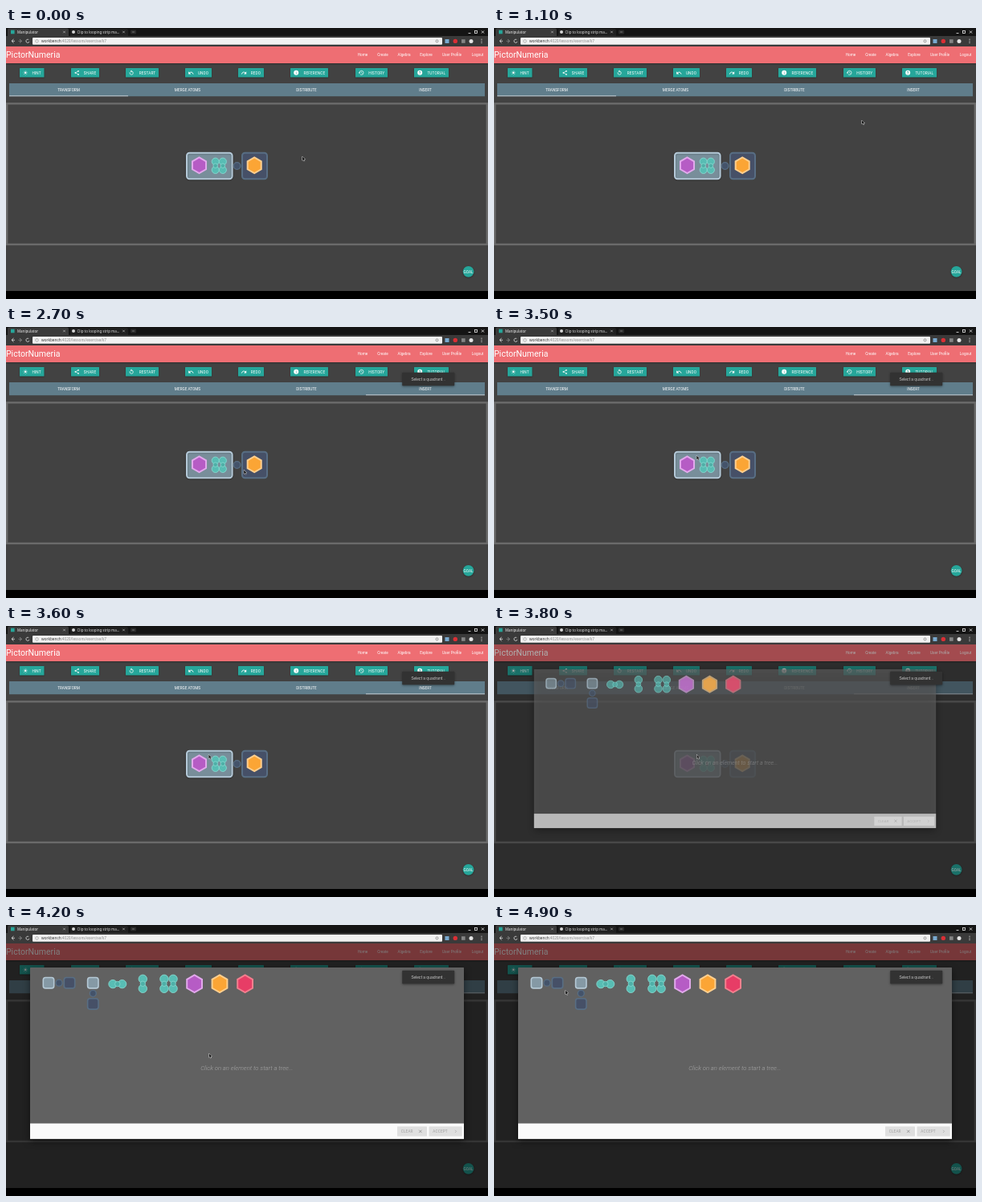
Write an HTML page with a canvas that moves like this. It is 600 by 338 pixels and loops after 5000 ms.

```html
<!DOCTYPE html>
<html lang="en">
<head>
<meta charset="utf-8">
<title>Manipulator</title>
<style>
html, body { margin: 0; width: 100%; height: 100%; overflow: hidden; background: #000; }
canvas { display: block; width: 600px; height: 338px; }
</style>
</head>
<body>
<canvas id="stage"></canvas>
<script>
const W = 600, H = 338, LOOP = 5000, STEP = 100;
const canvas = document.getElementById('stage');
const c = canvas.getContext('2d');
const dpr = window.devicePixelRatio || 1;
canvas.width = W * dpr;
canvas.height = H * dpr;

const SANS = 'Roboto, sans-serif';
const UI = '"Noto Sans", sans-serif';
const TEAL = '#26a69a';
const CLICK = 1897, OPEN = 3662;

const clamp = v => Math.max(0, Math.min(1, v));
const outQuad = v => 1 - (1 - clamp(v)) ** 2;
const outCubic = v => 1 - (1 - clamp(v)) ** 3;
const mix = (a, b, k) => a + (b - a) * k;

function rect(x, y, w, h, fill) {
  c.fillStyle = fill;
  c.fillRect(x, y, w, h);
}

function round(x, y, w, h, r, fill, edge, lw) {
  c.beginPath();
  c.roundRect(x, y, w, h, r);
  paint(fill, edge, lw);
}

function disc(x, y, r, fill, edge, lw) {
  c.beginPath();
  c.arc(x, y, r, 0, Math.PI * 2);
  paint(fill, edge, lw);
}

function paint(fill, edge, lw = 1) {
  if (fill) { c.fillStyle = fill; c.fill(); }
  if (edge) { c.strokeStyle = edge; c.lineWidth = lw; c.stroke(); }
}

function line(points, color, lw = 0.7, closed) {
  c.beginPath();
  points.forEach(([x, y]) => c.lineTo(x, y));
  if (closed) c.closePath();
  paint(null, color, lw);
}

function arc(x, y, r, a, b, color = '#fff', lw = 0.7) {
  c.beginPath();
  c.arc(x, y, r, a, b);
  paint(null, color, lw);
}

function poly(points, fill) {
  c.beginPath();
  points.forEach(([x, y]) => c.lineTo(x, y));
  c.closePath();
  paint(fill);
}

function text(s, x, y, size, color, align = 'left', style = '', family = SANS, gap = 0) {
  c.font = `${style} ${size}px ${family}`;
  c.letterSpacing = gap + 'px';
  c.textAlign = align;
  c.textBaseline = 'alphabetic';
  c.fillStyle = color;
  c.fillText(s, x, y);
}

function shadow(blur, dy, color, draw) {
  c.save();
  c.shadowBlur = blur * dpr;
  c.shadowOffsetY = dy * dpr;
  c.shadowColor = color;
  draw();
  c.restore();
}

function hexagon(x, y, r, fill, edge) {
  const ring = k => Array.from({ length: 6 }, (_, i) => {
    const a = Math.PI * (i / 3 - 0.5);
    return [x + k * Math.cos(a), y + k * Math.sin(a)];
  });
  poly(ring(r), edge);
  poly(ring(r - 2.3), fill);
}

const purple = (x, y, r) => hexagon(x, y, r, '#b65cc5', '#e2a9ec');
const orange = (x, y, r) => hexagon(x, y, r, '#fba535', '#ffcf8e');
const red = (x, y, r) => hexagon(x, y, r, '#e73d66', '#f27f8e');

function lobes(x, y, dx, dy, r) {
  for (const s of [-1, 1]) disc(x + s * dx, y + s * dy, r, '#58bdb4', '#87d8d0', 0.9);
  disc(x, y, r * 0.62, '#4fb0a8', '#87d8d0', 0.8);
}

function quad(x, y, dx, dy, r) {
  lobes(x - dx, y, 0, dy, r);
  lobes(x + dx, y, 0, dy, r);
}

const lightSlot = (x, y) => round(x - 6.7, y - 6.7, 13.4, 13.4, 3, '#8599a5', '#b5c9d6', 1.6);
const darkSlot = (x, y) => round(x - 6.7, y - 6.7, 13.4, 13.4, 3, '#465067', '#586e84', 1.6);
const joint = (x, y, r) => disc(x, y, r, '#44536a', '#586e84', 1.3);

function browser() {
  rect(0, 0, W, 11, '#141414');
  round(2, 0.5, 76, 12, [2, 2, 0, 0], '#3a3a3a');
  round(80, 1, 72, 9.5, [2, 2, 0, 0], '#202020');
  rect(0, 10, W, 13, '#3a3a3a');
  rect(6, 2.7, 4.6, 4.6, TEAL);
  text('Manipulator', 14, 6.9, 4.5, '#eee', 'left', '', UI);
  disc(84, 5, 2, '#d5d5d5');
  text('Clip to looping strip ma…', 88.5, 6.9, 4.5, '#ddd', 'left', '', UI);
  for (const x of [72.5, 146.5]) cross(x, 5, 1.3, '#ccc', 0.6);
  round(155, 2.5, 7, 5, 1, '#2b2b2b');
  line([[157, 5], [160, 5]], '#bbb', 0.5);

  line([[575.5, 6.5], [578.5, 6.5]], '#eee', 0.8);
  c.strokeStyle = '#eee';
  c.lineWidth = 0.8;
  c.strokeRect(583.5, 3.5, 3, 3);
  cross(593.5, 5, 1.6, '#eee', 0.8);

  line([[9.5, 14], [7, 16.3], [9.5, 18.6]], '#ddd', 0.9);
  line([[7, 16.3], [11, 16.3]], '#ddd', 0.8);
  line([[17, 14], [19.5, 16.3], [17, 18.6]], '#888', 0.9);
  line([[15.5, 16.3], [19.5, 16.3]], '#888', 0.8);
  arc(27, 16.3, 2.1, 0.3, 5.4, '#ddd', 0.8);
  round(33, 12, 510, 8.8, 1, '#f1f1f1');
  disc(38.5, 16.4, 1.8, null, '#777', 0.5);
  const size = 4.7;
  text('workbench', 44, 18.1, size, '#333', 'left', '', UI);
  const w = c.measureText('workbench').width;
  text(':4020/lessons/exercise/k7', 44 + w, 18.1, size, '#8a8a8a', 'left', '', UI);
  disc(536.5, 16.4, 1.5, null, '#666', 0.6);
  rect(546.5, 14, 5, 5, '#79a9cf');
  disc(559.3, 16.4, 2.7, '#d92f35');
  rect(567, 14.2, 4.6, 4.6, '#858585');
  disc(579, 16.4, 2.5, '#e4e4e4');
  for (const y of [14.2, 16.3, 18.4]) disc(592, y, 0.6, '#ddd');
}

function cross(x, y, r, color, lw) {
  line([[x - r, y - r], [x + r, y + r]], color, lw);
  line([[x + r, y - r], [x - r, y + r]], color, lw);
}

const icons = {
  HINT(x, y) {
    disc(x, y, 1.3, '#fff');
    for (let i = 0; i < 8; i++) {
      const a = i * Math.PI / 4;
      disc(x + 2.4 * Math.cos(a), y + 2.4 * Math.sin(a), 0.38, '#fff');
    }
  },
  SHARE(x, y) {
    line([[x + 1.8, y - 2], [x - 1.8, y], [x + 1.8, y + 2]], '#fff', 0.6);
    for (const [dx, dy] of [[1.8, -2], [-1.8, 0], [1.8, 2]]) disc(x + dx, y + dy, 0.9, '#fff');
  },
  RESTART(x, y) {
    arc(x, y + 0.3, 2.1, -1.4, 3.6);
    poly([[x + 0.3, y - 3.2], [x + 0.3, y - 0.4], [x - 1.5, y - 1.8]], '#fff');
  },
  UNDO(x, y, s = 1) {
    c.beginPath();
    c.moveTo(x - 2 * s, y + 0.3);
    c.quadraticCurveTo(x + 1.4 * s, y - 2.4, x + 2.9 * s, y + 1.8);
    paint(null, '#fff', 0.9);
    poly([[x - 3 * s, y - 1.6], [x - 3 * s, y + 1.6], [x + 0.2 * s, y + 1.6]], '#fff');
  },
  REDO(x, y) { icons.UNDO(x, y, -1); },
  REFERENCE(x, y) {
    disc(x, y, 3, '#fff');
    rect(x - 0.3, y - 0.4, 0.6, 2, TEAL);
    rect(x - 0.3, y - 1.6, 0.6, 0.6, TEAL);
  },
  HISTORY(x, y) {
    arc(x + 0.3, y, 2.5, -Math.PI, 2.3);
    poly([[x - 3.5, y - 0.2], [x - 0.9, y - 0.2], [x - 2.2, y + 1.2]], '#fff');
    line([[x + 0.3, y - 1.4], [x + 0.3, y + 0.2], [x + 1.4, y + 0.9]], '#fff', 0.5);
  },
  TUTORIAL(x, y) {
    disc(x, y, 3, '#fff');
    text('?', x, y + 1.7, 4.6, TEAL, 'center', 'bold');
  }
};

const buttons = [
  ['HINT', 17, 47.5], ['SHARE', 81, 116], ['RESTART', 149, 190], ['UNDO', 223, 256],
  ['REDO', 289, 321], ['REFERENCE', 354, 401], ['HISTORY', 435, 475], ['TUTORIAL', 508, 551]
];
const links = [['Home', 444], ['Create', 469], ['Algebra', 495.5], ['Explore', 523],
  ['User Profile', 555], ['Logout', 587]];

function page(t) {
  rect(0, 22.5, W, 305.5, '#424242');
  shadow(2, 0.7, 'rgba(0,0,0,.35)', () => rect(0, 23, W, 21, '#ee6e73'));
  text('PictorNumeria', 0, 37.2, 10.5, '#fff');
  for (const [s, x] of links) text(s, x, 35.2, 4.7, '#fff', 'center');

  for (const [s, x0, x1] of buttons) {
    shadow(1.5, 0.7, 'rgba(0,0,0,.4)', () => round(x0, 50, x1 - x0, 11.6, 0.6, TEAL));
    icons[s](x0 + 7.2, 55.8);
    text(s, x1 - 3.8, 57.5, 4.7, '#fff', 'right', '', SANS, 0.15);
  }

  rect(4, 69, 592, 16.2, '#607d8b');
  ['TRANSFORM', 'MERGE ATOMS', 'DISTRIBUTE', 'INSERT'].forEach((s, i) =>
    text(s, 78 + 148 * i, 78.7, 4.7, '#fff', 'center'));
  const left = mix(4, 448, outQuad((t - CLICK - 90) / 300));
  const right = mix(152, 596, outQuad((t - CLICK) / 300));
  rect(left, 84.4, right - left, 0.8, '#d8dde0');

  c.strokeStyle = '#6a6a6a';
  c.lineWidth = 2.4;
  c.strokeRect(1.2, 94.3, 597.6, 175.6);

  shadow(2, 0.6, 'rgba(0,0,0,.3)', () => round(225, 155.7, 56.6, 32.6, 3.5, '#788e9a', '#b4c9d8', 2));
  purple(240.5, 171.3, 11);
  quad(265.3, 171.8, 4.6, 5.2, 4.5);
  joint(287.6, 172, 4.3);
  round(294, 155.7, 31, 32.6, 3.5, '#465067', '#586e84', 2);
  orange(309.2, 171.3, 11);

  shadow(2, 0.8, 'rgba(0,0,0,.4)', () => disc(575.6, 303.8, 6.9, TEAL));
  text('GOAL', 575.6, 305.5, 4.7, '#fff', 'center');
}

function modal(t) {
  if (t < OPEN) return;
  const p = outQuad((t - OPEN) / 350);
  const k = mix(0.8, 1, p);
  rect(0, 22.5, W, 305.5, `rgba(0,0,0,${0.5 * p})`);

  c.save();
  c.globalAlpha = p;
  c.translate(300, mix(141, 160, p));
  c.scale(k, k);
  c.translate(-300, -160);
  shadow(8, 3, 'rgba(0,0,0,.5)', () => round(30, 53, 540, 214, 0.6, '#616161'));
  rect(30, 247.5, 540, 19.3, '#fafafa');

  lightSlot(53, 72.2);
  joint(66, 72.2, 4);
  darkSlot(79, 72.2);
  lightSlot(108.3, 72.2);
  joint(108.3, 85.3, 4);
  darkSlot(108.3, 98.4);
  lobes(138.8, 73.6, 5.8, 0, 5.2);
  lobes(170.3, 73.3, 0, 6, 5.2);
  quad(202.5, 73.3, 5.6, 6, 5.2);
  purple(234.6, 73.3, 12);
  orange(266, 73.3, 12);
  red(297.6, 73.3, 12);

  text('Click on an element to start a tree...', 299.7, 181.2, 7.7, '#a6a6a6', 'center', 'italic 300');

  const ink = '#9f9f9f';
  round(487, 251.3, 37, 12.2, 0.6, '#dfdfdf');
  round(526.5, 251.3, 41.2, 12.2, 0.6, '#dfdfdf');
  text('CLEAR', 491.7, 259.2, 4.7, ink, 'left', '', SANS, 0.15);
  text('ACCEPT', 531.3, 259.2, 4.7, ink, 'left', '', SANS, 0.15);
  cross(515.8, 257.4, 1.7, '#858585', 0.7);
  line([[559, 255.8], [560.6, 257.4], [559, 259]], ink, 0.6);
  c.restore();
}

function toast(t) {
  if (t < CLICK) return;
  const p = outCubic((t - CLICK) / 300);
  c.save();
  c.globalAlpha = p;
  c.translate(0, 10.9 * (1 - p));
  shadow(3, 1, 'rgba(0,0,0,.4)', () => round(493.2, 56.8, 65, 16.4, 0.6, '#323232'));
  text('Select a quadrant...', 525.7, 66.7, 5.1, '#fff', 'center', '300');
  c.restore();
}

// time, x, y of the pointer tip
const path = [
  [0, 369, 160.5], [500, 369, 160.5], [1100, 458, 115], [1200, 474, 99], [1600, 506, 82],
  [2000, 508, 81], [2100, 490, 92], [2400, 314, 174], [2500, 301, 178],
  [3000, 289, 179], [3100, 252, 160.5], [4400, 253, 160.5], [4900, 89, 81.7]
];

function pointer(t) {
  const i = Math.max(1, path.findIndex(p => p[0] >= t));
  const [a, b] = [path[i - 1], path[i]];
  const k = clamp((t - a[0]) / (b[0] - a[0]));
  c.save();
  c.translate(mix(a[1], b[1], k), mix(a[2], b[2], k));
  c.beginPath();
  for (const [x, y] of [[0, 0], [0, 4.7], [1.1, 3.8], [1.9, 5.5], [2.7, 5.1], [1.9, 3.5], [3.3, 3.3]]) c.lineTo(x, y);
  c.closePath();
  c.lineJoin = 'round';
  paint(null, '#e8e8e8', 0.9);
  paint('#1c1c1c');
  c.restore();
}

function draw(now) {
  const t = Math.floor((now % LOOP) / STEP) * STEP;
  c.setTransform(dpr, 0, 0, dpr, 0, 0);
  rect(0, 0, W, H, '#000');
  page(t);
  modal(t);
  browser();
  toast(t);
  pointer(t);
}

let start;
function tick(now) {
  start ??= now;
  draw(Math.max(0, now - start));
  requestAnimationFrame(tick);
}
draw(0);
requestAnimationFrame(tick);
</script>
</body>
</html>
```
